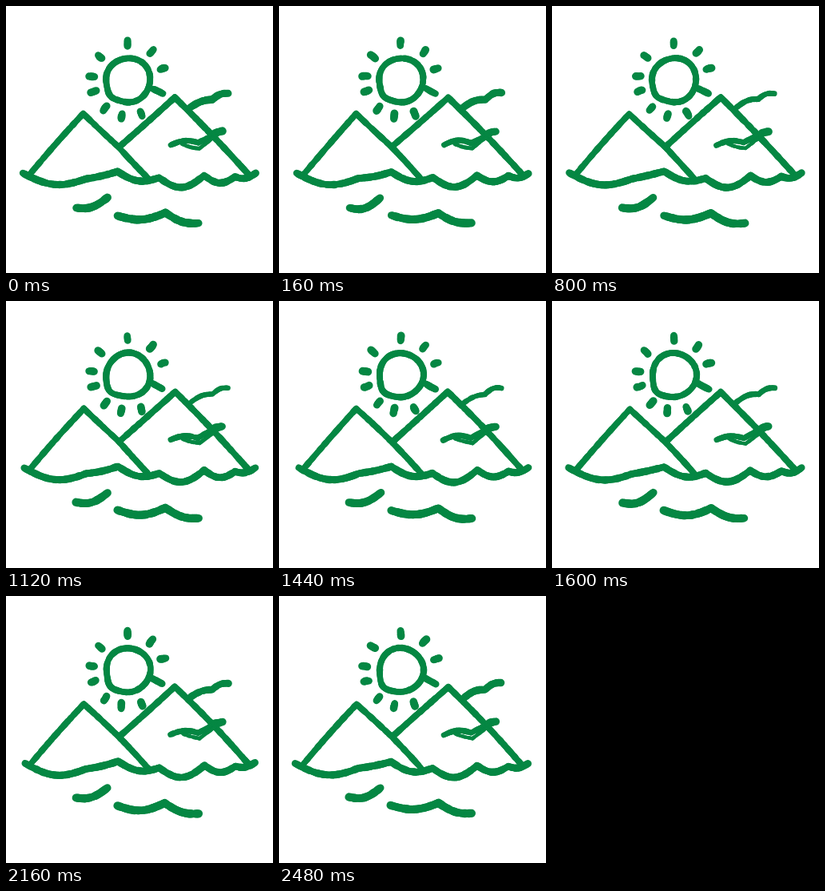
These frames come from a looping animation (334 by 334 pixels, 2640 ms). An HTML page with a canvas:

```html
<!DOCTYPE html>
<html lang="en">
<head>
<meta charset="utf-8">
<title>Mountains by the sea</title>
<style>
  html, body { margin: 0; width: 100%; height: 100%; overflow: hidden; background: #fff; }
  canvas { display: block; width: 100%; height: 100%; }
</style>
</head>
<body>
<canvas id="stage" width="334" height="334"></canvas>
<script>
const ctx = document.getElementById('stage').getContext('2d');
const LOOP = 2640, HOLD = 160;
const SUN = { x: 153, y: 92.5, radius: 27.5 };
let step = 0;

// Seeded noise in -1..1, different for every drawing
function noise(a, b) {
  const n = Math.sin(a * 12.9898 + b * 78.233 + step * 37.719) * 43758.5453;
  return (n - Math.floor(n)) * 2 - 1;
}

// Inks a curve given as t -> [x, y], with a slightly rough edge.
function ink(weight, curve, length) {
  const count = Math.ceil(length / 2);
  let last = curve(0);
  for (let i = 1; i <= count; i++) {
    const point = curve(i / count);
    ctx.lineWidth = weight + noise(...point) * 0.7;
    ctx.beginPath();
    ctx.moveTo(...last);
    ctx.lineTo(...point);
    ctx.stroke();
    last = point;
  }
}

// Shared points move together, so joined strokes stay joined.
const wobble = (x, y) => [x + noise(x, y) * 0.6, y + noise(y, x) * 0.6];

// Chain of strokes; each next point is [x, y, sag], sag bending the line downwards.
function chain(weight, start, ...points) {
  let from = start;
  for (const [x, y, sag = 0] of points) {
    const [x1, y1] = wobble(...from), [x2, y2] = wobble(x, y);
    const bend = sag + noise(x, sag) * 0.6;
    ink(weight, t => [
      x1 + (x2 - x1) * t,
      y1 + (y2 - y1) * t + bend * Math.sin(Math.PI * t)
    ], Math.hypot(x2 - x1, y2 - y1));
    from = [x, y];
  }
}

function drawSun() {
  const { x, y, radius } = SUN;
  const phase = noise(x, y) * Math.PI;
  ink(7.8, t => {
    const a = t * 2 * Math.PI;
    const corner = 3 * Math.exp(-8 * (a - 2.4) ** 2);
    const r = radius + corner + 0.5 * Math.sin(3 * a + phase);
    return [x + r * Math.cos(a), y + r * Math.sin(a)];
  }, 2 * Math.PI * radius);

  for (const degrees of [-91, -51, -18, 69, 101, 129, 162, 186, 219]) {
    const a = degrees * Math.PI / 180;
    const at = r => [x + r * Math.cos(a), y + r * Math.sin(a)];
    chain(9.2, at(42.5), at(49));
  }
  chain(8.5, [183, 103], [196, 110]);
}

function drawMountains() {
  chain(7.5, [30, 211], [97, 135, -1], [141, 176], [178, 216]);
  chain(7.8, [142, 176], [211.5, 114], [304, 211, -2]);
}

function drawSea() {
  const tip = 20 + (step + 1.6) % 5.5;
  chain(8.8, [tip, 209], [100, 216, 11], [140, 207, 1], [192, 215, 8],
    [248, 212, 13], [287, 213, 8], [312, 209, 4]);
  chain(9.8, [88, 252], [127, 240, 6]);
  chain(9.8, [140, 262], [199, 259, 7], [241, 272, 5]);
}

function drawBirds() {
  const wing = 7.5 + 1.5 * Math.cos(step / 15 * 2 * Math.PI);
  chain(wing, [231, 127], [258, 117, -3], [278, 109, -3]);
  chain(7, [206, 174], [240, 171, -4], [268, 157]);
  chain(4.5, [220, 172], [242, 178, 1], [270, 157]);
  chain(9.5, [262, 159], [271, 157]);
}

function draw(time) {
  const t = time % LOOP;
  // One drawing is held 80 ms longer than the rest.
  step = Math.floor((t < 2000 ? t : t - 80) / HOLD);
  ctx.fillStyle = '#fff';
  ctx.fillRect(0, 0, 334, 334);
  ctx.strokeStyle = '#058743';
  ctx.lineCap = 'round';
  drawSun();
  drawMountains();
  drawSea();
  drawBirds();
}

const start = performance.now();
function tick() {
  draw(performance.now() - start);
  requestAnimationFrame(tick);
}
tick();
</script>
</body>
</html>
```
